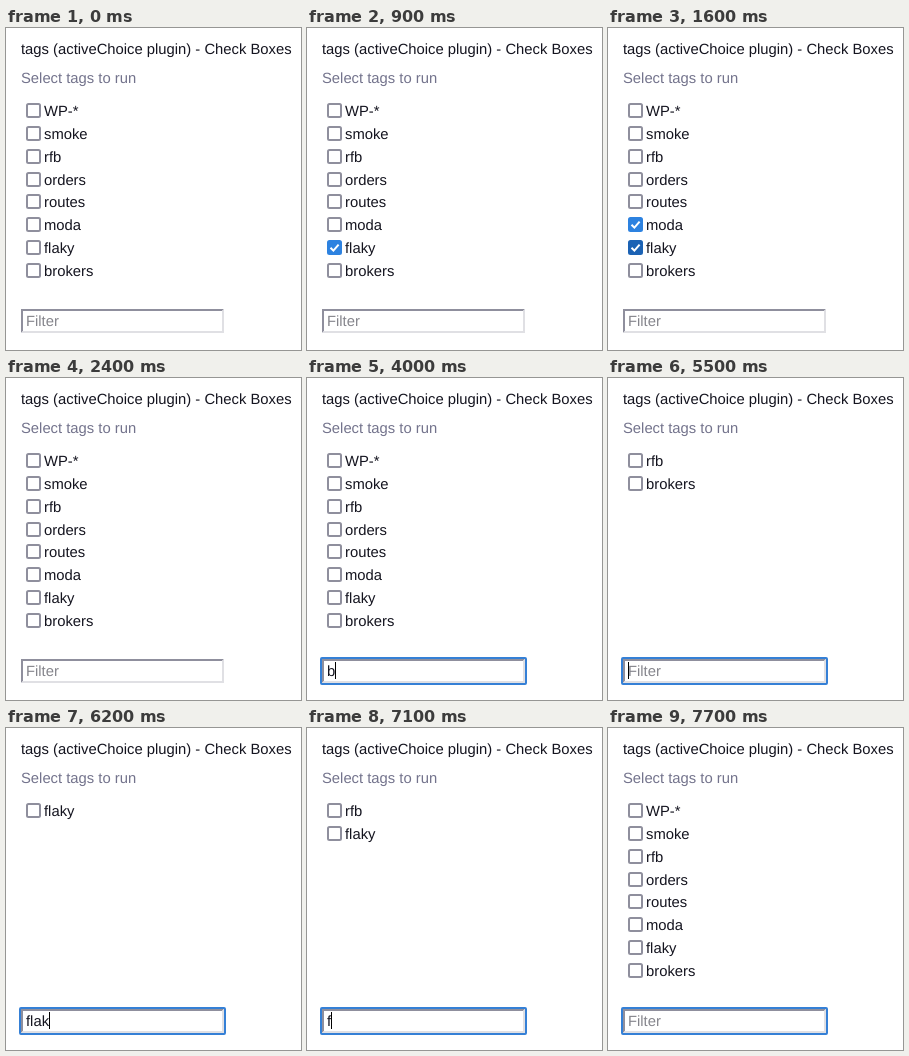
Write an HTML page that moves like this. It is 295 px wide and 322 px high and loops after 8000 ms.

```html
<!DOCTYPE html>
<html lang="en">
<head>
<meta charset="utf-8">
<title>Tag filter</title>
<style>
html, body { margin: 0; width: 100%; height: 100%; overflow: hidden; background: #fff; }
svg { display: block; }
text { font: 14.8px "Liberation Sans", Arial, sans-serif; fill: #14141f; text-rendering: geometricPrecision; white-space: pre; }
.note { fill: #73738c; }
.hint { fill: #85858c; }
</style>
</head>
<body>
<svg width="295" height="322">
  <text x="15" y="26">tags (activeChoice plugin) - Check Boxes</text>
  <text x="15" y="55" class="note">Select tags to run</text>
  <g id="rows"></g>
  <path d="M15 305V281H218L216 283H17V303Z" fill="#8f8f9d"/>
  <path d="M218 281V305H15L17 303H216V283Z" fill="#e0e0e4"/>
  <rect id="ring" x="14" y="280" width="205" height="26" rx="1" fill="none" stroke="#3580d6" stroke-width="2"/>
  <text id="field" x="20" y="298"></text>
  <rect id="caret" y="284" width="1" height="17"/>
</svg>
<script>
const LOOP = 8000;
const tags = ['WP-*', 'smoke', 'rfb', 'orders', 'routes', 'moda', 'flaky', 'brokers'];
const $ = id => document.getElementById(id);

// Checkbox colours: idle, hover, pressed; the same three when checked.
const colors = ['#8f8f9d', '#676774', '#484851', '#2d82e0', '#2472cc', '#1b62b4'];

// Each track is a list of [start time, value] steps.
const boxes = {
  flaky: [[0, 0], [500, 1], [700, 2], [800, 4], [900, 3], [1400, 4], [1600, 5], [1700, 1], [1900, 0]],
  moda: [[0, 0], [1000, 1], [1100, 2], [1200, 4], [1300, 3], [2000, 4], [2200, 5], [2300, 1], [2400, 0]]
};
const typed = [[0, ''], [4000, 'b'], [4200, 'br'], [4400, 'bro'], [4500, 'brok'],
  [4900, 'bro'], [5100, 'br'], [5300, 'b'], [5500, ''],
  [5900, 'f'], [6000, 'fl'], [6100, 'fla'], [6200, 'flak'],
  [6500, 'fla'], [6900, 'fl'], [7000, 'f'], [7200, '']];
// The list follows the typed text a little later.
const query = typed.map(([t, s]) => [t && t + 100, s]);
const focus = [[0, false], [2900, true]];
const blink = [[0, true], [6500, false], [6600, true], [7700, false]];

const at = (track, t) => track.findLast(step => step[0] <= t)[1];

function row(tag, i, state) {
  const y = Math.round(75.2 + 22.8 * i);
  const color = colors[state];
  const box = `<rect x="21" y="${y + 1}" width="13" height="13" rx="1.5" stroke-width="2"
    stroke="${color}" fill="${state > 2 ? color : '#fff'}"/>`;
  const check = state > 2
    ? `<path d="M23.5 ${y + 7.7}l2.9 2.9 5.2-6" fill="none" stroke="#fff" stroke-width="2"/>` : '';
  return `${box}${check}<text x="38" y="${y + 13}">${tag}</text>`;
}

let shown = '';
function draw(t) {
  const wanted = at(query, t);
  const html = tags.filter(tag => tag.includes(wanted))
    .map((tag, i) => row(tag, i, boxes[tag] ? at(boxes[tag], t) : 0)).join('');
  if (html !== shown) $('rows').innerHTML = shown = html;

  const text = at(typed, t), field = $('field'), focused = at(focus, t);
  field.textContent = text || 'Filter';
  field.setAttribute('class', text ? '' : 'hint');
  const width = text ? field.getComputedTextLength() : 0;
  $('caret').setAttribute('x', Math.floor(20.3 + width));
  $('caret').style.display = focused && at(blink, t) ? '' : 'none';
  $('ring').style.display = focused ? '' : 'none';
}

const start = performance.now();
function tick() {
  draw((performance.now() - start) % LOOP);
  requestAnimationFrame(tick);
}
tick();
</script>
</body>
</html>
```
